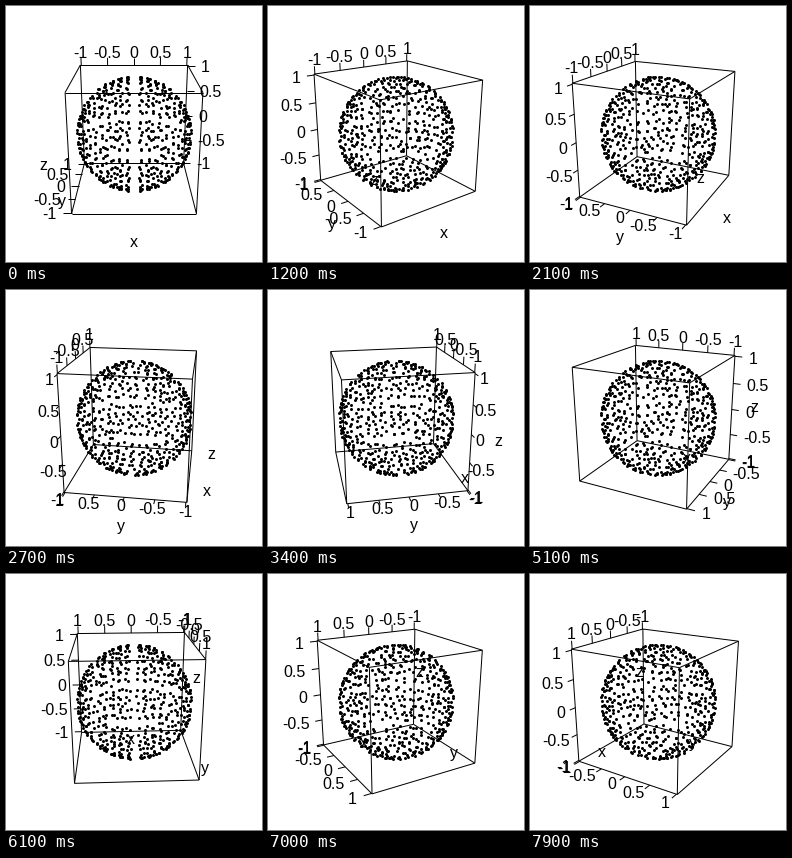
These frames come from a looping animation (256 by 256 pixels, 8000 ms). A matplotlib script:

```python
from itertools import permutations, product

import matplotlib.pyplot as plt
import numpy as np
from matplotlib.animation import FuncAnimation
from matplotlib.collections import LineCollection

SIZE, DPI = 256, 100
PX = 72 / DPI                        # points per pixel
FRAMES, STEP = 80, 3                 # degrees per frame
TILT = np.radians(20)
DIST, FOCAL = 7.87, 454
CENTER = np.array([128, 127.7])
DATA = 0.984                         # data unit in box half-widths
TICK, GAP, MARGIN = 0.133, 0.25, 1.32
VALUES = [-1, -0.5, 0, 0.5, 1]

plt.rcParams["font.family"] = "Liberation Sans"


def sphere_points():
    """Points on the unit sphere with full octahedral symmetry."""
    seeds = [(.115, .115), (.24, .10), (.36, .13), (.49, .10), (.62, .13),
             (.27, .23), (.37, .27), (.51, .23), (.61, .29), (.42, .37),
             (.54, .40), (.56, .52)]
    pts = set()
    for b, c in seeds:
        a = (1 - b * b - c * c) ** 0.5
        for p in permutations((a, b, c)):
            for s in product((-1, 1), repeat=3):
                pts.add(tuple(u * v for u, v in zip(p, s)))
    return np.array(sorted(pts))


def project(p, angle):
    x, y, z = np.moveaxis(np.asarray(p, float), -1, 0)
    c, s = np.cos(angle), np.sin(angle)
    x, y = x * c - y * s, x * s + y * c
    up = z * np.cos(TILT) + y * np.sin(TILT)
    near = z * np.sin(TILT) - y * np.cos(TILT)
    k = FOCAL / (DIST - near)
    return np.stack([CENTER[0] + x * k, CENTER[1] - up * k], axis=-1)


def box_edges():
    edges = []
    for axis in range(3):
        for u, v in product((-1, 1), repeat=2):
            edges.append([np.insert([u, v], axis, e) for e in (-1, 1)])
    return np.array(edges, float)


def axis_edges(angle):
    """For x, y and z: a point of the silhouette edge and its tick direction."""
    s, c = np.sin(angle), np.cos(angle)
    back = 1 if c > 0 else -1
    front = -1 if s > 0 else 1
    up = (0, 0, 1)
    if s == 0:
        y_axis = (-1, 0, -1), (-1, 0, 0)
    elif abs(s) * np.cos(TILT) > np.sin(TILT):
        y_axis = (front, 0, -1), (front, 0, 0)
    else:
        y_axis = (-front, 0, 1), up
    return [((0, back, 1), up), y_axis, ((front, back, 0), (front, 0, 0))]


POINTS = DATA * sphere_points()
EDGES = box_edges()
NAME_POS = MARGIN * np.array([(0, -1, -1), (-1, 0, -1), (-1, -1, 0)])

fig = plt.figure(figsize=(SIZE / DPI, SIZE / DPI), dpi=DPI, facecolor="white")
ax = fig.add_axes([0, 0, 1, 1])
ax.set(xlim=(0, SIZE), ylim=(SIZE, 0))
ax.axis("off")

lines = LineCollection([], colors="black", linewidths=PX)
ax.add_collection(lines)
dots, = ax.plot([], [], "o", color="black", ms=3 * PX, mew=0)


def label(s):
    return ax.text(0, 0, s, fontsize=16 * PX, ha="center", va="baseline")


names = [label(s) for s in "xyz"]
numbers = [[label(f"{v:g}") for v in VALUES] for _ in range(3)]
renderer = fig.canvas.get_renderer()
widths = [t.get_window_extent(renderer).width for t in numbers[0]]


def draw(i):
    angle = np.radians(i * STEP)
    segments = list(project(EDGES, angle))
    for axis, (base, out) in enumerate(axis_edges(angle)):
        out = np.array(out, float)
        for value, text, width in zip(VALUES, numbers[axis], widths):
            p = np.array(base, float)
            p[axis] = value * DATA
            a, b, pos = project([p, p + TICK * out, p + GAP * out], angle)
            segments.append(np.array([a, b]))
            # sideways ticks push their label outward
            d = (pos - a) / np.hypot(*(pos - a))
            shift = 0.5 * width * d[0] * abs(d[0])
            text.set_position((pos[0] + shift, pos[1] + 6))
    lines.set_segments(segments)
    dots.set_data(*project(POINTS, angle).T)
    for text, (x, y) in zip(names, project(NAME_POS, angle)):
        text.set_position((x, y + 5))
    return [lines, dots, *names, *sum(numbers, [])]


anim = FuncAnimation(fig, draw, frames=FRAMES, interval=100,
                     repeat=True, repeat_delay=0)
plt.show()
```
